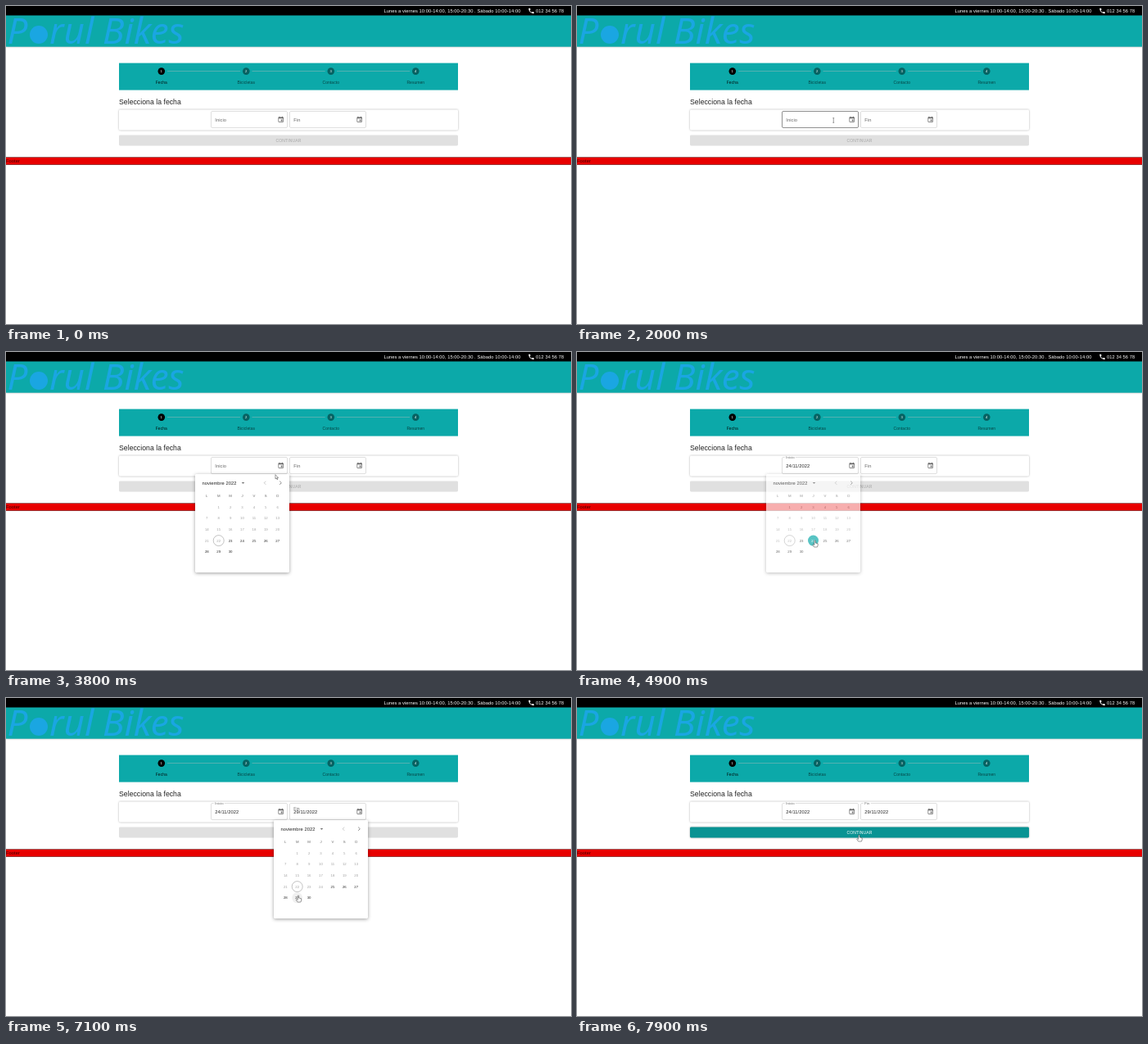
Write an HTML page that moves like this. It is 690x388 px and loops after 8000 ms.

```html
<!DOCTYPE html>
<html lang="es">
<head>
<meta charset="utf-8">
<title>Selecciona la fecha</title>
<style>
  html, body { margin: 0; width: 100%; height: 100%; overflow: hidden; background: #fff; }
  svg { display: block; width: 690px; height: 388px; font: 5.75px "Liberation Sans", Arial, sans-serif; }
  text { white-space: pre; }
  .body { letter-spacing: .054px; }
  .small { font-size: 5.03px; letter-spacing: .05px; }
  .tiny { font-size: 4.31px; }
  .mid { text-anchor: middle; }
  .logo { font: italic 44px "Noto Sans", "Open Sans", sans-serif; }
  .raised { filter: drop-shadow(0 .8px .8px rgba(0,0,0,.32)); }
  .popup { filter: drop-shadow(0 1.8px 2px rgba(0,0,0,.38)); }
</style>
</head>
<body>
<svg id="stage" viewBox="0 0 690 388"></svg>
<script>
const LOOP = 8000, STEP = 100, TEAL = '#0ca9a9';
const stage = document.getElementById('stage');
const ink = a => `rgba(0,0,0,${a})`;

function add(parent, tag, attrs, content) {
  const el = document.createElementNS('http://www.w3.org/2000/svg', tag);
  set(el, attrs);
  if (content !== undefined) el.textContent = content;
  parent.append(el);
  return el;
}
function set(el, attrs) {
  for (const k in attrs) el.setAttribute(k, attrs[k]);
}
const rect = (p, x, y, width, height, fill, more) => add(p, 'rect', { x, y, width, height, fill, ...more });
const text = (p, x, y, str, fill, cls = 'body') => add(p, 'text', { x, y, fill, class: cls }, str);
const disc = (p, cx, cy, r, fill, more) => add(p, 'circle', { cx, cy, r, fill, ...more });
const icon = (p, x, y, d, fill) => add(p, 'path', { d, fill, transform: `translate(${x} ${y}) scale(.359)` });

const EVENT = 'M17 12h-5v5h5zM16 1v2H8V1H6v2H5a2 2 0 0 0-2 2v14a2 2 0 0 0 2 2h14a2 2 0 0 0 2-2V5a2 2 0 0 0-2-2h-1V1zm3 18H5V8h14z';
const PHONE = 'M6.6 10.8c1.4 2.8 3.8 5.1 6.6 6.6l2.2-2.2c.3-.3.7-.4 1-.2 1.1.4 2.3.6 3.6.6.5 0 1 .4 1 1V20c0 .5-.5 1-1 1C10.600 21 3 13.400 3 4c0-.5.5-1 1-1h3.500c.5 0 1 .5 1 1 0 1.200.2 2.400.6 3.600.1.300 0 .7-.3 1z';

// Header
rect(stage, 0, 11, 690, 38.700, TEAL, { class: 'raised' });
rect(stage, 0, 0, 690, 11.500, '#000');
text(stage, 461.5, 7.900, 'Lunes a viernes 10:00-14:00, 15:00-20:30 . Sábado 10:00-14:00', '#fff');
icon(stage, 637.2, 1.600, PHONE, '#fff');
text(stage, 647, 7.900, '012 34 56 78', '#fff');
const BLUE = '#1aa6e2';
text(stage, 1.500, 46, 'P', BLUE, 'logo');
disc(stage, 40, 35, 11, BLUE);
text(stage, 53, 46, 'rul', BLUE, 'logo');
text(stage, 118, 46, 'Bikes', BLUE, 'logo');

// Stepper
rect(stage, 138, 69.6, 414, 33, TEAL);
['Fecha', 'Bicicletas', 'Contacto', 'Resumen'].forEach((name, i) => {
  const x = 189.8 + i * 103.5;
  if (i) rect(stage, x - 96.3, 79.300, 89.200, .4, '#bdbdbd');
  disc(stage, x, 79.600, 4.300, i ? ink(.42) : '#000');
  text(stage, x, 81.100, i + 1, '#fff', 'tiny mid');
  text(stage, x, 95.200, name, ink(i ? .6 : .87), 'small mid');
});

text(stage, 138, 120, 'Selecciona la fecha', ink(.87)).style.fontSize = '8.63px';

// Form
rect(stage, 138, 126.500, 414, 25, '#fff', { class: 'raised', rx: 1.400 });
const button = rect(stage, 138, 157.500, 414, 13, '#e0e0e0', { rx: 1.400 });
const buttonText = text(stage, 345, 165.800, 'CONTINUAR', ink(.26), 'small mid');
buttonText.style.letterSpacing = '.144px';

rect(stage, 0, 184.600, 690, 9.100, '#e80000');
rect(stage, 0, 184.500, 690, .5, ink(.7));
rect(stage, 0, 193.200, 690, .5, ink(.7));
text(stage, 0, 191.100, 'Footer', ink(.7));

function makeField(x, name, value, notch) {
  const border = rect(stage, x, 128.500, 93, 20, 'none', { rx: 1.400, 'stroke-width': .5 });
  const gap = rect(stage, x + 3.200, 127.800, notch, 1.500, '#fff');
  const halo = disc(stage, x + 85.200, 138.700, 6.600, '#000');
  icon(stage, x + 80.900, 134.300, EVENT, ink(.6));
  const hint = text(stage, x + 4.800, 140.800, 'dd/mm/aaaa', ink(.87));
  const label = text(stage, 0, 0, name, ink(.6));
  return {
    draw(float, filled, c, pressed) {
      const over = c.x > x && c.x < x + 93 && c.y > 128 && c.y < 149;
      const onIcon = over && c.x > x + 79;
      set(border, { stroke: ink(over ? .87 : .25) });
      set(gap, { opacity: float > .7 ? 1 : 0 });
      set(halo, { opacity: onIcon ? (pressed ? .15 : .05) : 0 });
      hint.textContent = filled ? value : 'dd/mm/aaaa';
      set(hint, { opacity: filled ? 1 : .42 * float });
      set(label, { transform: `translate(${x + 4.800} ${140.700 - 10.400 * float}) scale(${1 - .25 * float})` });
      return onIcon ? 'hand' : over ? 'beam' : '';
    }
  };
}

function makeCalendar(cx, min, picked) {
  const g = add(stage, 'g', { class: 'popup' });
  rect(g, -57.500, 0, 115, 120, '#fff', { rx: 1.400 });
  text(g, -49, 12.800, 'noviembre 2022', ink(.87));
  add(g, 'path', { d: 'M-.8 10h3.600l-1.800 1.800z', fill: ink(.6) });
  const chevron = (x, dir, a) => add(g, 'path', {
    d: `M${x} 8.600l${dir * 2.100} 2.100l${-dir * 2.100} 2.100`, fill: 'none', stroke: ink(a), 'stroke-width': .7
  });
  chevron(28.800, -1, .3);
  chevron(45.700, 1, .65);
  const colX = c => (c - 3) * 14.400;
  [...'LMMJVSD'].forEach((d, c) => text(g, colX(c), 27.600, d, ink(.6), 'tiny mid'));
  const days = [];
  for (let n = 1; n <= 30; n++) {
    const x = colX(n % 7), y = 40 + Math.floor(n / 7) * 13.700;
    const dot = disc(g, x, y, 6.500, 'none', n === 22 ? { stroke: ink(.6), 'stroke-width': .4 } : {});
    const num = text(g, x, y + 1.500, n, ink(.38), 'tiny mid');
    if (n >= min) days.push({ n, x, y, dot, num });
  }
  return {
    draw(opacity, scale, filled, c) {
      const sx = .75 + .25 * scale, sy = .5625 + .4375 * scale;
      set(g, { opacity, transform: `translate(${cx} 149) scale(${sx} ${sy})` });
      let kind = opacity > .3 && Math.abs(c.x - cx) < 57 && c.y > 149 && c.y < 269 ? 'arrow' : '';
      for (const d of days) {
        const over = Math.hypot(c.x - cx - d.x, c.y - 149 - d.y) < 6.500;
        const on = filled && d.n === picked;
        if (over && kind) kind = 'hand';
        set(d.dot, { fill: on ? TEAL : over ? ink(.06) : 'none' });
        set(d.num, { fill: on ? '#fff' : ink(.87) });
      }
      return kind;
    }
  };
}

const start = makeField(250.500, 'Inicio', '24/11/2022', 13);
const end = makeField(346.500, 'Fin', '29/11/2022', 9);
const startCal = makeCalendar(288.500, 23, 24);
const endCal = makeCalendar(384.500, 25, 29);

const pointer = add(stage, 'path', { fill: '#fff', stroke: '#222', 'stroke-width': .45, 'stroke-linejoin': 'round' });
const SHAPES = {
  arrow: 'M0 0V5.200l1.200-1.100.9 1.900.9-.4-.9-1.800h1.600z',
  hand: 'M-.7 4.500V.6a.7.7 0 0 1 1.400 0V3l3 .8V6L2.900 8H-.9l-1.900-2.800q.6-1.200 2.100.2z',
  beam: 'M-.9-2.800h1.800M0-2.800v5.600M-.9 2.800h1.800'
};

const PATH = [
  [1200, 31, 208], [1400, 130, 190], [1600, 255, 148], [1700, 292, 141], [1800, 292, 141],
  [2200, 334.500, 138], [3600, 334.500, 138], [4500, 290.500, 230], [4900, 290.500, 230],
  [5200, 431, 139], [5300, 431, 139], [5600, 433, 135], [5900, 433, 135],
  [6600, 357, 238], [6800, 357, 241], [7200, 357, 241], [7900, 344.500, 167]
];
const START_FLOAT = [[3000, 0], [3100, .4], [3200, .9], [3400, 0], [4700, 0], [4800, .6], [4900, 1]];
const END_FLOAT = [[7000, 0], [7100, .4], [7200, 1]];

const clamp = v => Math.max(0, Math.min(1, v));
const smooth = v => v * v * (3 - 2 * v);

function track(keys, t, col = 1, ease = v => v) {
  const i = keys.findIndex(k => k[0] > t);
  if (i === 0) return keys[0][col];
  if (i < 0) return keys[keys.length - 1][col];
  const a = keys[i - 1], b = keys[i];
  return a[col] + (b[col] - a[col]) * ease((t - a[0]) / (b[0] - a[0]));
}

// Pop-up: fades over the whole time, scales over two thirds of it
function popup(t, open, close, time = 260) {
  const curve = v => 1 - (1 - smooth(clamp(v))) ** 1.500;
  const i = (t - open) / time, o = (t - close) / time;
  return o < 0 ? [curve(i), curve(i * 1.500)] : [1 - curve(o), 1 - curve((o - .333) * 1.500)];
}

function draw(t) {
  const c = { x: track(PATH, t, 1, smooth), y: track(PATH, t, 2, smooth) };
  const kinds = [
    startCal.draw(...popup(t, 3110, 4820), t >= 4800, c),
    endCal.draw(...popup(t, 5810, 7120), t >= 7200, c),
    start.draw(track(START_FLOAT, t), t >= 4800, c, t >= 2900 && t < 3300),
    end.draw(track(END_FLOAT, t), t >= 7100, c, t >= 5800 && t < 6200)
  ];
  const ready = t >= 7200;
  const onButton = ready && c.y > 157 && c.y < 171;
  if (onButton) kinds.push('hand');
  set(button, { fill: !ready ? '#e0e0e0' : onButton ? '#099393' : TEAL, class: ready ? 'raised' : '' });
  set(buttonText, { fill: ready ? '#fff' : ink(.26) });
  const kind = kinds.find(k => k) || 'arrow';
  set(pointer, { d: SHAPES[kind], transform: `translate(${c.x} ${c.y})`, opacity: t < 1200 ? 0 : 1 });
}

let begin;
function tick(now) {
  begin ??= now;
  draw(Math.floor((now - begin) % LOOP / STEP) * STEP);
  requestAnimationFrame(tick);
}
draw(0);
requestAnimationFrame(tick);
</script>
</body>
</html>
```
